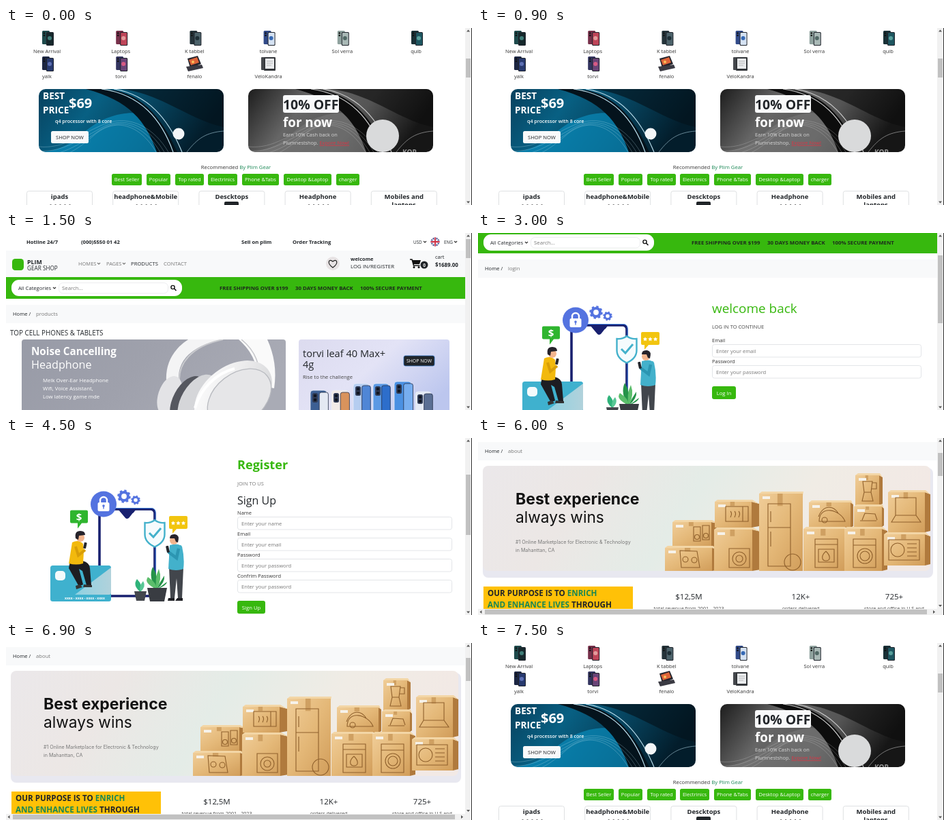
These frames come from a looping animation (683 by 261 pixels, 8 s). An HTML page:

```html
<!DOCTYPE html>
<html lang="en">
<head>
<meta charset="utf-8">
<title>Shop tour</title>
<style>
html, body { margin: 0; width: 100%; height: 100%; overflow: hidden; background: #fff; }
svg { display: block; width: 683px; height: 261px; font: 7.5px "Open Sans", "Noto Sans", sans-serif; fill: #212529; }
.page { visibility: hidden; animation: show 8s step-end calc(var(--i) * 1.5s) infinite; }
.home { visibility: visible; animation: none; }
@keyframes show { 0% { visibility: visible } 18.75%, 100% { visibility: hidden } }
</style>
</head>
<body>
<svg id="stage" viewBox="0 0 683 261"></svg>
<script>
const GREEN = '#37b80e';
const rect = (x, y, w, h, fill, more = '') => `<rect x="${x}" y="${y}" width="${w}" height="${h}" fill="${fill}" ${more}/>`;
const circle = (x, y, r, fill, more = '') => `<circle cx="${x}" cy="${y}" r="${r}" fill="${fill}" ${more}/>`;
const oval = (x, y, rx, ry, tilt, fill, more = '') =>
  `<ellipse rx="${rx}" ry="${ry}" transform="translate(${x} ${y}) rotate(${tilt})" fill="${fill}" ${more}/>`;
const path = (d, fill = 'none', more = '') => `<path d="${d}" fill="${fill}" ${more}/>`;
const line = (d, stroke, width = 1, more = '') => path(d, 'none', `stroke="${stroke}" stroke-width="${width}" ${more}`);
const text = (x, y, s, more = '') => `<text x="${x}" y="${y}" ${more}>${s.replace(/&/g, '&amp;')}</text>`;
const bold = (x, y, s, more = '') => text(x, y, s, 'font-weight="700" ' + more);
const mid = (x, y, s, more = '') => text(x, y, s, 'text-anchor="middle" ' + more);
const shift = (y, s) => `<g transform="translate(0 ${y})">${s}</g>`;
const size = (n, fill = '#212529') => `font-size="${n}" fill="${fill}"`;
const fill = c => `fill="${c}"`;
const chevron = (x, y, c = '#333') => line(`M${x - 2} ${y - 1}l2 2 2-2`, c, 1.2);
const gradient = (id, x2, y2, ...colors) => `<linearGradient id="${id}" x2="${x2}" y2="${y2}">${colors.map((c, i) =>
  `<stop offset="${i / (colors.length - 1)}" stop-color="${c}"/>`).join('')}</linearGradient>`;
const clip = (id, x, y, w, h, r) => `<clipPath id="${id}">${rect(x, y, w, h, '#000', `rx="${r}"`)}</clipPath>`;
const clipped = (id, s) => `<g clip-path="url(#${id})">${s}</g>`;

const defs = `<defs>
  ${gradient('blue', 1, .25, '#07415e', '#086083', '#06415b', '#031d2b')}
  ${gradient('gray', 1, .25, '#1d1d1d', '#666', '#555', '#161616')}
  ${gradient('slate', 1, .3, '#989ba7', '#9fa1ac', '#a9abb5')}
  ${gradient('lilac', 1, .6, '#dcdbef', '#e3e3f6', '#bcc6ee')}
  ${gradient('cup', 1, 1, '#ffffff', '#ececed', '#d0d1d4')}
  ${gradient('hero', 1, .15, '#ebe8ea', '#ece7e5', '#e4ece7', '#f0ece5', '#f2e9e5')}
  ${gradient('carton', 1, 1, '#f0cd98', '#e4b878', '#d19d5a')}
  ${gradient('card', 1, 0, '#a9dce8', '#d7dde0')}
  ${clip('bannerL', 48, 90, 271, 93, 10)}${clip('bannerR', 355, 90, 271, 93, 10)}
  ${clip('noise', 23, 157, 387, 120, 4)}${clip('phones', 429, 157, 221, 120, 4)}
</defs>`;

const scrollbar = (y, h) => rect(673, 0, 9, 261, '#f1f1f1') + rect(674, y, 7, h, '#c1c1c1') +
  path('M675 5.5l2.5-3 2.5 3z', '#555') + path('M675 255.5l2.5 3 2.5-3z', '#555');

// ---- home ----
const phone = (x, y, back, front, spot) => rect(x - 7, y, 11, 20, back, 'rx="1.5"') +
  rect(x - 1, y + 2, 11, 20, '#20242c', 'rx="1.5"') + rect(x, y + 3, 9, 18, front, 'rx="1"') +
  circle(x + 4, y + 11, 3, spot) + circle(x - 4, y + 3.5, 1.3, '#111') + circle(x - 4, y + 7, 1.3, '#111');

const swirl = (x, glow, dark, edge) => path(`M${x} 183c60-2 62-45 120-56s68 34 80 56z`, glow, 'opacity=".65"') +
  path(`M${x + 95} 90c52 3 84 38 108 93h-30c-16-46-40-76-104-93z`, dark) +
  path(`M${x + 120} 90c60 6 100 46 151 56V90z`, dark, 'opacity=".65"') +
  line(`M${x + 92} 90c58 8 88 45 105 93M${x + 110} 90c50 8 80 44 100 93`, edge, 1.2) +
  [0, 6, 12, 18].map(d => line(`M${x + 190 - d} 183c-20-35-56-56-92-${42 - d}s-60 38-98 34`, edge, .5, 'opacity=".6"')).join('') +
  line(`M${x + 271} 152c-25 2-38 10-54 31`, edge, .8, 'opacity=".7"');

const labels = [['New Arrival', 'Laptops', 'K tabbel', 'tolvane', 'Sol verra', 'quib'], ['yalk', 'torvi', 'fenalo', 'VeloKandra']];
const devices = [
  ['#1e4a4c', '#16282c', '#3f7d78'], ['#77304a', '#be4458', '#e39b9c'], ['#24333a', '#4c626a', '#1d2e35'],
  ['#314a88', '#d5e2f2', '#3568b4'], ['#8fa29e', '#a9b9b6', '#516965'], ['#183036', '#1e5660', '#58a09c'],
  ['#1c2643', '#27396e', '#5d70b4'], ['#343560', '#694477', '#d95b84']];
const reader = rect(374, 43, 13, 19, '#45484d', 'rx="1"') + rect(378, 43, 17, 20, '#33363a', 'rx="1"') +
  rect(380, 45, 13, 15, '#e9ebed') + line('M382 49h9M382 52h9M382 55h7', '#999', .6);
const slider = path('M266 45l15-4 5 12-16 6z', '#25242c') + path('M268 47l12-4 3 8-12 4z', '#de6438') +
  path('M264 57l23-3 2 5-22 5z', '#3a3a43') + circle(274, 50, 2, '#fbc15b');

const tags = [[155, 44, 'Best Seller'], [206, 35, 'Popular'], [248, 42, 'Top rated'], [296, 43, 'Electrinics'],
  [346, 54, 'Phone &Tabs'], [407, 70, 'Desktop &Laptop'], [484, 34, 'charger']];
const cards = ['ipads', 'headphone&Mobile', 'Descktops', 'Headphone', 'Mobiles and'];

const home = labels.map((row, r) => row.map((s, i) => mid(60 + 108.2 * i, 37 + 37 * r, s, fill('#333'))).join('')).join('') +
  devices.map((c, i) => phone(60 + 108.2 * (i % 6), i < 6 ? 4 : 42, ...c)).join('') + slider + reader +
  clipped('bannerL', rect(48, 90, 271, 93, 'url(#blue)') + swirl(48, '#0a8fc0', '#04131c', '#b8dcea')) +
  bold(54, 105, 'BEST', size(13.6, '#fff')) + bold(54, 126, 'PRICE', size(13.6, '#fff')) + bold(92, 118, '$69', size(20, '#fff')) +
  text(72, 140, 'q4 processor with 8 core', 'font-weight="600" ' + size(7.1, '#fff')) +
  rect(66, 152, 55, 18, '#f8f9fa', 'rx="2.5"') + mid(93.5, 163.5, 'SHOP NOW', size(7.6)) + circle(253, 156, 8.5, '#f3f6f8') +
  clipped('bannerR', rect(355, 90, 271, 93, 'url(#gray)') + swirl(355, '#777', '#0d0d0d', '#c9c9c9') +
    bold(581, 187, 'KQR', size(10, '#999'))) +
  circle(552, 159, 24, '#d9dadb') +
  rect(406, 99, 82, 26, '#f8f9fa', 'rx="3"') + bold(406, 120, '10% OFF', size(19.4)) + bold(406, 146, 'for now', size(18.8, '#fff')) +
  text(406, 160, 'Earn 10% Cash back on', size(7.4, '#d8d8d8')) +
  text(406, 172, 'Plumnestshop. <tspan fill="#dc3545" text-decoration="underline">Expore Now!</tspan>', size(7.4, '#d8d8d8')) +
  mid(337, 208, 'Recommended <tspan fill="#198754">By Plim Gear</tspan>', size(7.7, '#333')) +
  tags.map(([x, w, s]) => rect(x, 215, w, 17, GREEN, 'rx="2.5"') + mid(x + w / 2, 226.3, s, size(7.5, '#fff'))).join('') +
  cards.map((s, i) => {
    const x = 30.5 + 126.2 * i;
    const stars = i % 2 < 1 && i ? '' : [0, 1, 2, 3, 4].map(k => rect(x + 34 + k * 7, 260, 2, 1, '#777')).join('');
    return rect(x, 240.5, 96, 40, '#fff', 'rx="3" stroke="#dee0e2"') + mid(x + 48, 251.5, s, 'font-weight="700" ' + size(9.5)) + stars;
  }).join('') +
  rect(320, 256, 21, 9, '#212529', 'rx="2"') + mid(583, 264, 'laptops', 'font-weight="700" ' + size(9.5)) +
  scrollbar(45, 28);

// ---- shared header ----
const promo = (s, x) => bold(x, 84, s, size(7.85, '#1d2a1d'));
const header = crumb => rect(0, 26, 673, 39, '#f8f9fa') +
  bold(30, 15.5, 'Hotline 24/7', size(7.6)) + bold(110, 15.5, '(000)5550 01 42', size(7.6)) +
  bold(345, 15.5, 'Sell on plim', size(7.7)) + bold(420, 15.5, 'Order Tracking', size(7.6)) +
  text(597, 15.5, 'USD', size(6.3)) + chevron(614, 13) + text(642, 15.5, 'ENG', size(6.3)) + chevron(659, 13) +
  circle(629, 13, 6.5, '#27357e') + line('M624.5 8.5l9 9M633.5 8.5l-9 9', '#fff', 1.6) + line('M629 6.5v13M622.5 13h13', '#fff', 3.4) +
  line('M629 6.5v13M622.5 13h13', '#d02c40', 1.8) +
  rect(9, 38, 17, 17, GREEN, 'rx="4.5"') + bold(31, 45.5, 'PLIM', size(8.8)) + text(31, 54.5, 'GEAR SHOP', size(8.2)) +
  text(106, 48, 'HOMES', fill('#777')) + chevron(136, 45, '#777') + text(147, 48, 'PAGES', fill('#777')) + chevron(173, 45, '#777') +
  text(183, 48, 'PRODUCTS', size(7.7)) + text(231, 48, 'CONTACT', size(7.7, '#777')) +
  circle(479, 45, 10, '#e7e3e4') + line('M479 51c-10-7-5-14 0-9 5-5 10 2 0 9z', '#222', 1.2) +
  bold(505, 41, 'welcome') + text(505, 52, 'LOG IN/REGISTER', size(7.9)) +
  line('M592 39h3l2.5 9h9', '#111', 1.5) + path('M595 40h13l-2 6h-9z', '#111') + circle(598, 50.5, 1.5, '#111') + circle(605, 50.5, 1.5, '#111') +
  circle(613, 47, 5.5, '#212529') + mid(613, 49.5, '0', 'font-weight="700" ' + size(6.5, '#fff')) +
  text(629, 38, 'cart') + bold(629, 50, '$1689.00', size(7.9)) +
  rect(0, 65, 673, 32, GREEN) + rect(8, 69, 250, 24, '#fff', 'rx="11"') + text(18, 84, 'All Categories', size(7.6)) + chevron(71, 81) +
  rect(77.5, 73.5, 160, 15.5, '#fff', 'rx="6" stroke="#e4e6e8" stroke-width=".7"') + text(82, 84, 'Search...', size(7.8, '#777')) +
  circle(244.5, 80, 2.6, 'none', 'stroke="#111" stroke-width="1.4"') + line('M246.5 82l3 3', '#111', 1.6) +
  promo('FREE SHIPPING OVER $199', 313) + promo('30 DAYS MONEY BACK', 424) + promo('100% SECURE PAYMENT', 519) +
  rect(0, 106, 673, 27, '#f8f9fa') + text(10, 122, 'Home /', size(7.6)) + text(44, 122, crumb, size(7.7, '#777'));

// ---- products ----
const headset = line('M318 148C262 158 236 188 246 232', '#f4f4f5', 18) + line('M318 157C274 166 248 192 255 228', '#c9cace', 2) +
  oval(240, 240, 17, 30, 18, '#e3e3e6') + oval(266, 246, 21, 38, 28, '#55575f') + oval(281, 247, 24, 42, 30, '#d5d6d9') +
  path('M341 157h42c10 22 14 46 10 72l-24-5c1-28-7-48-28-67z', '#fafafa') + line('M345 157c21 17 28 38 27 64', '#c5c6ca', 1.5) +
  oval(333, 240, 64, 43, -38, 'url(#cup)') + oval(342, 243, 52, 36, -38, '#e6e6e8', 'stroke="#b9bbc0" stroke-width="1.3"') +
  line('M277 258c8-28 30-51 58-58', '#fff', 4);
const handset = (x, y, w, color, screen) => rect(x, y, w, 50, color, 'rx="4" stroke="#e7edf8" stroke-width=".8"') +
  rect(x + w * .55, y + 3, w * .55, 50, screen, 'rx="3" stroke="#26304a" stroke-width=".8"') +
  rect(x + 3, y + 4, 8, 14, '#303b55', 'rx="2.5"') + circle(x + 7, y + 8, 2.2, '#10151f') + circle(x + 7, y + 14, 2.2, '#10151f');
const products = header('products') + text(6, 150.5, 'TOP CELL PHONES & TABLETS', 'font-weight="500" ' + size(9.9)) +
  clipped('noise', rect(23, 157, 387, 120, 'url(#slate)') + headset) +
  bold(37, 180, 'Noise Cancelling', size(15.2, '#fff')) + text(37, 199.5, 'Headphone', 'font-weight="500" ' + size(16.2, '#fff')) +
  ['Melk Over-Ear Headphone', 'Wifi, Voice Assistant,', 'Low latency game mde'].map((s, i) => text(54, 219.5 + 12 * i, s, size(7.8, '#fff'))).join('') +
  clipped('phones', rect(429, 157, 221, 120, 'url(#lilac)') +
    handset(446, 232, 24, '#3c5f93', '#e4e9f3') + handset(477, 232, 24, '#f1ebe8', '#d9935c') + handset(509, 222, 23, '#b5cdf0', '#4f86d6') +
    handset(538, 222, 23, '#5b99e4', '#2d6ecb') + handset(569, 219, 25, '#4a90e2', '#77aef0') + handset(600, 234, 23, '#e4eaf5', '#5b6f94')) +
  text(435, 183, 'torvi leaf 40 Max+', 'font-weight="500" ' + size(14.6)) + text(435, 199, '4g', 'font-weight="500" ' + size(14.6)) +
  text(435, 215, 'Rise to the challenge', size(7.6, '#444')) +
  rect(583, 181, 45, 15, '#212529', 'rx="2.5" stroke="#2c6db8" stroke-width=".8"') + mid(605.5, 191, 'SHOP NOW', size(6.9, '#fff')) +
  scrollbar(9, 28);

// ---- sign-in illustration ----
const gear = (x, y, r) => circle(x, y, r, 'none', `stroke="#5473e0" stroke-width="${r * .7}"`) +
  circle(x, y, r * 1.4, 'none', `stroke="#5473e0" stroke-width="${r * .45}" stroke-dasharray="${r * .55}"`);
const leaf = (x, y, dx, dy, c) => path(`M${x} ${y}q${dx - 7} ${dy / 2} ${dx} ${dy}q${7 - dx / 2} ${-dy / 2} ${-dx} ${-dy}`, c);
const star = x => path(`M${x} 122.2l1 2 2.2.3-1.6 1.6.4 2.2-2-1-2 1 .4-2.2-1.6-1.6 2.2-.3z`, '#fff');
const art = rect(137, 105, 81, 128, '#fff', 'rx="6" stroke="#18206f" stroke-width="3.6"') +
  line('M140 103.5h73q6 0 6 6v121', '#3c7bdc', 1) + path('M165 106h25l-3 4q-2 1-3 3l-4 5q-3 2-5 0l-5-6z', '#18206f') +
  circle(143, 97.5, 19, '#5473e0') + rect(134.5, 95, 17, 13, '#fff', 'rx="2"') + line('M138 96v-4a5 5 0 0 1 10 0v4', '#fff', 2.4) +
  circle(143, 100, 1.8, '#5473e0') + line('M143 100v4.5', '#5473e0', 1.4) + gear(173, 86, 6) + gear(190, 91.5, 4.2) +
  path('M96 106.5h22q2 0 2 2v15q0 2-2 2h-7l-6 8v-8h-9q-2 0-2-2v-15q0-2 2-2z', '#2fb52f') + mid(107, 122, '$', 'font-weight="700" ' + size(15, '#fff')) +
  path('M241 115h23q2 0 2 2v15q0 2-2 2h-14l-6 7v-7h-3q-2 0-2-2v-15q0-2 2-2z', '#f2c50f') + star(245) + star(252.5) + star(260) +
  path('M218 121q7 5 14.5 4v17q0 12-14.5 18.5q-14.5-6.5-14.5-18.5v-17q7.5 1 14.5-4z', '#f5fbfd', 'stroke="#43b1cb" stroke-width="2.4"') +
  line('M210 140l6 6 11-13', '#43b1cb', 3) +
  rect(65, 188, 89, 53, '#3fb1ce', 'rx="3.5"') + path('M101 231l53-40v37q0 3-3 3z', 'url(#card)', 'opacity=".75"') +
  rect(72, 196, 15, 14, '#f4fafb', 'rx="5"') + bold(86, 238, 'xxxx - xxxx - xxxx - xxxx', size(5, '#fff')) +
  path('M94 181h18q11 3 11 11l2 25h-7l-6-21-5-3 6 23-6 3-15-27z', '#1d1d22') +
  path('M114 216l12 1v3h-13zM102 218l6-2 4 4-9 3z', '#333') +
  path('M97 154q9-5 16 2l1 11-1 18q-10 3-21 0z', '#f2b90d') + line('M102 160l4 13 10-8', '#d89e08', 4) +
  circle(109, 147, 6, '#f3b58e') + path('M102 148q-2-11 7-11 7 0 7 6l-9 1-1 6z', '#26232b') + rect(114, 154, 4, 9, '#24262c', 'rx="1" transform="rotate(12 116 158)"') +
  path('M239 191h21l-2 45h-6l-2-29-3 29h-6z', '#42464c') + path('M238 236h9v4h-10zM251 236h8v4h-11z', '#1e1f24') +
  path('M240 158q12-4 18 2 4 17 2 33-11 4-22 0z', '#43b1cb') + line('M253 163l-3 14-12-9', '#2c96b2', 4.5) +
  circle(246, 151, 6, '#f3b58e') + path('M240 148q0-7 8-6 7 1 4 12l-3-1-2-5z', '#26232b') + rect(235, 159, 4, 10, '#24262c', 'rx="1" transform="rotate(-12 237 164)"') +
  leaf(197, 227, -5, -19, '#2fb37a') + leaf(197, 227, 4, -16, '#58c795') + path('M188 226h18l-3 14h-12z', '#44474d') +
  [[-6, -33], [3, -30], [11, -20], [-13, -18], [15, -11]].map(([dx, dy], i) => leaf(221, 223, dx, dy, i % 2 ? '#5bbd6b' : '#259349')).join('') +
  path('M207 221h29l-4 20h-21z', '#393c42');

const field = (x, y, w, name, hint) => text(x, y, name, fill('#333')) +
  rect(x + .5, y + 3.5, w, 18.5, '#fff', 'rx="3" stroke="#e0e3e6" stroke-width=".9"') + text(x + 6, y + 16, hint, size(7.6, '#777'));
const button = (x, y, w, s) => rect(x, y, w, 19, GREEN, 'rx="3"') + mid(x + w / 2, y + 12.5, s, size(7.7, '#fff'));

const login = shift(-67, header('login')) + shift(31, art) +
  text(343, 117.5, 'welcome back', size(18.9, GREEN)) + text(343, 141, 'LOG IN TO CONTINUE', size(7.5, '#444')) +
  field(343, 161, 306, 'Email', 'Enter your email') + field(343, 192, 306, 'Password', 'Enter your password') +
  button(343, 226, 35, 'Log In') + scrollbar(33, 100);

const register = art + bold(339, 46, 'Register', size(18.1, GREEN)) + text(339, 70, 'JOIN TO US', size(7.5, '#777')) +
  text(339, 97.5, 'Sign Up', 'font-weight="500" ' + size(16)) +
  [['Name', 'name'], ['Email', 'email'], ['Password', 'password'], ['Confrim Password', 'password']].map(([name, hint], i) =>
    field(339, 113 + 31 * i, 314, name, 'Enter your ' + hint)).join('') +
  button(339, 240, 41, 'Sign Up') + scrollbar(54, 89);

// ---- about ----
const crate = (x, y, w, h, side, icon) => rect(x, y, w, h, 'url(#carton)') +
  path(`M${x + w} ${y}l${side} 3v${h - 5}l${-side} 2z`, '#b07a3d') + path(`M${x} ${y}l4-3h${w - 3}l${side - 1} 6-${side}-3z`, '#f3d6a6') +
  rect(x + w * .42, y, w * .12, h * .16, '#cfa062') + rect(x + 5, y + 4, 11, 4, '#f6f2ea') + line(icon, '#8f602c', 1.1);
const square = (x, y, w, h) => `M${x} ${y}h${w}v${h}h${-w}z`;
const ring = (x, y, r) => `M${x - r} ${y}a${r} ${r} 0 1 0 ${2 * r} 0a${r} ${r} 0 1 0 ${-2 * r} 0`;
const crates = crate(285, 124, 57, 37, 13, square(316, 131, 10, 21) + ring(321, 146, 3.5) + square(329, 129, 10, 21) + ring(334, 144, 3.5)) +
  crate(274, 162, 69, 34, 13, 'M296 166l25 1 4 24H298z' + ring(304, 179, 4) + ring(317, 180, 4)) +
  crate(347, 94, 54, 38, 11, square(363, 101, 33, 22) + 'M388 101v22' + 'M370 108q3 3 0 9M376 108q3 3 0 9M382 108q3 3 0 9') +
  crate(346, 135, 56, 61, 12, square(368, 163, 30, 28) + ring(383, 178, 10) + ring(383, 178, 5)) +
  crate(412, 82, 64, 114, 0, square(425, 97, 33, 92) + 'M425 132h33M429 108v16M429 138v22' + ring(461, 183, 12)) +
  crate(553, 55, 35, 44, 5, 'M564 64h14l-2 16h-10zM566 80h10l3 13h-16zM578 66h6v9h-7') +
  crate(551, 101, 41, 30, 3, 'M560 122h24M563 121l4-10 15 1 3 9') +
  crate(485, 95, 61, 37, 4, 'M500 123c0-25 31-18 38 0z' + ring(508, 121, 4) + 'M528 111c-7-12-22-13-29 5') +
  crate(477, 134, 60, 62, 0, square(494, 149, 33, 42) + 'M494 157h33' + square(499, 164, 23, 19) + 'M510 167c-8 7-6 14 0 14s8-6 0-14') +
  crate(537, 134, 55, 62, 8, square(550, 149, 33, 42) + 'M550 158h33' + ring(567, 174, 11) + ring(567, 174, 7)) +
  crate(601, 80, 54, 59, 8, square(612, 88, 30, 26) + 'M606 124l6-10h30l7 10z') +
  crate(595, 142, 60, 46, 8, square(602, 150, 45, 30) + ring(615, 165, 10) + 'M629 156h14M629 162h14M629 168h14M629 174h14');

const stat = (x, value, note) => mid(x, 238, value, size(11.5)) + mid(x, 253.5, note, size(7.2, '#444'));
const about = shift(-100, header('about')) +
  rect(7, 44, 660, 162, '#e8e8f0', 'rx="8"') + rect(7, 41, 656, 155, 'url(#hero)', 'rx="8"') + crates +
  `<g font-family="Inter, sans-serif">${bold(55, 97.5, 'Best experience', size(23, '#111'))}${text(55, 125, 'always wins', size(22.7, '#111'))}
  ${text(55, 155.5, '#1 Online Marketplace for Electronic & Technology', size(7.1, '#777'))}${text(55, 167.5, 'in Mahanttan, CA', size(7.1, '#777'))}</g>` +
  rect(8, 219, 219, 40, '#ffc107') +
  bold(14, 233, 'OUR PURPOSE IS TO <tspan fill="#198754">ENRICH</tspan>', size(11.6)) +
  bold(14, 250, '<tspan fill="#198754">AND ENHANCE LIVES</tspan> THROUGH', size(11.7)) +
  stat(309, '$12,5M', 'total revenue from 2001 - 2023') + stat(473, '12K+', 'orders delivered') + stat(610, '725+', 'store and office in U.S and') +
  scrollbar(22, 34) + rect(0, 252, 682, 9, '#f1f1f1') + rect(10, 253, 648, 7, '#c1c1c1') +
  path('M5.5 254l-3 2.5 3 2.5z', '#555') + path('M667 254l3 2.5-3 2.5z', '#555') + path('M675 246l2.5 3 2.5-3z', '#555');

const pages = [home, products, login, register, about];
document.getElementById('stage').innerHTML = defs + pages.map((content, i) =>
  `<g class="page ${i ? '' : 'home'}" style="--i:${i}">${rect(0, 0, 683, 261, '#fff')}${content}</g>`).join('') +
  rect(682, 0, 1, 261, '#333');
</script>
</body>
</html>
```
